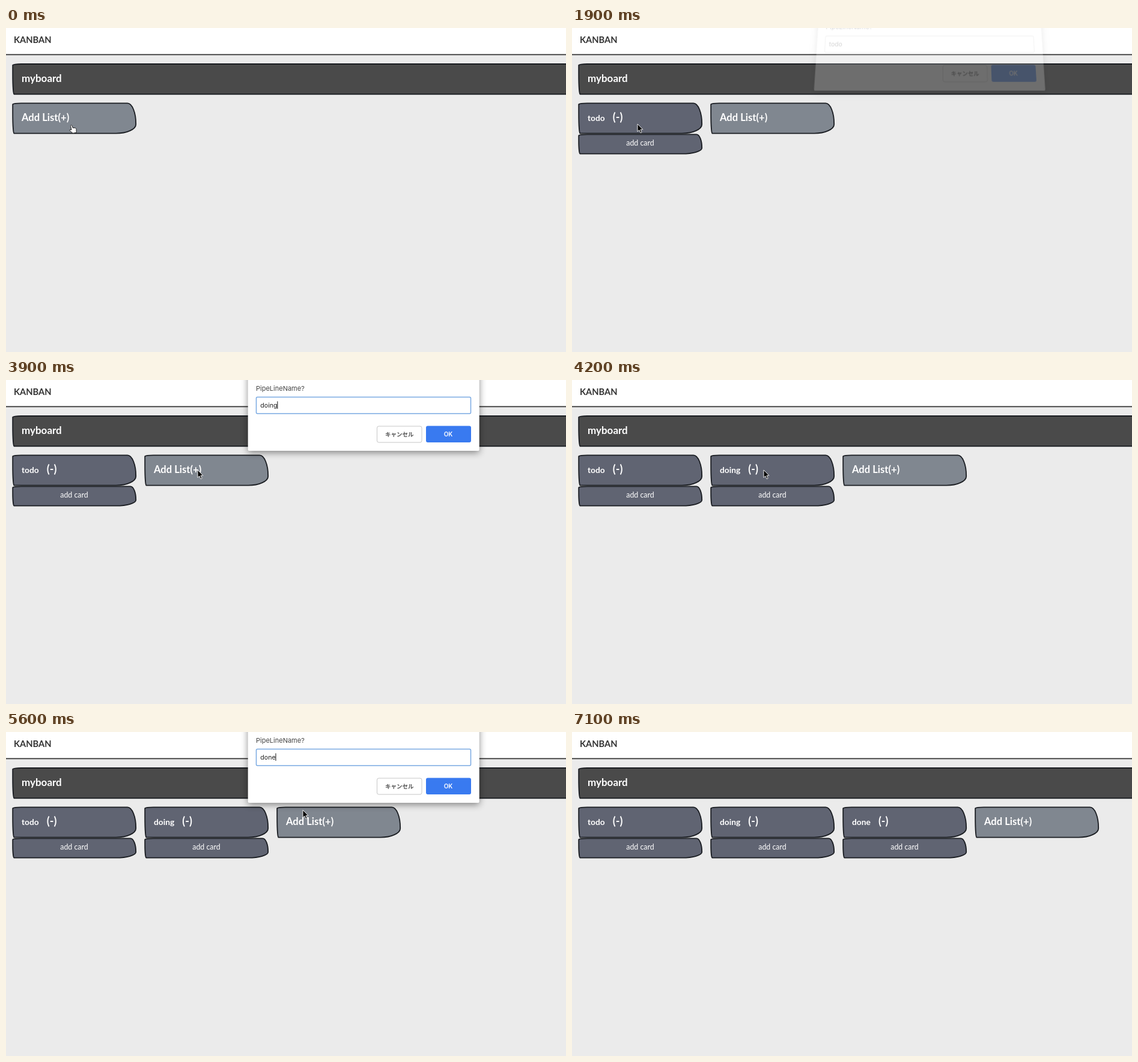
Animation, 932 px wide and 540 px high, one loop 7.2 s. Source, as an HTML page:

```html
<!DOCTYPE html>
<html lang="ja">
<head>
<meta charset="utf-8">
<title>Kanban board</title>
<style>
html, body { margin: 0; width: 100%; height: 100%; overflow: hidden; background: #ebebeb; }
svg { position: absolute; left: 0; top: 0; width: 932px; height: 540px; font-family: Lato, "Open Sans", sans-serif; }
#board text { fill: #fff; font-weight: 700; }
#board .logo { fill: #333; font-size: 14.7px; }
.big { font-size: 16.6px; }
.name { font-size: 13.8px; }
.minus { font-size: 18px; }
#board .card { font-size: 12.4px; font-weight: 400; text-anchor: middle; }
.box { stroke: #191c21; stroke-width: 1.8; }
#dialog { font-family: Inter, Roboto, sans-serif; transform-origin: 595px 118px; }
#dialog .panel { fill: #fff; filter: drop-shadow(0 3px 6px rgba(0, 0, 0, .45)); }
#dialog .button { font-size: 10px; font-weight: 600; text-anchor: middle; }
#typed { font-size: 10.6px; fill: #222; }
</style>
</head>
<body>
<svg id="board">
  <rect width="932" height="44" fill="#fff"/>
  <path d="M0 44.4H932" stroke="#333" stroke-width="1.7"/>
  <text class="logo" x="13" y="24.5">KANBAN</text>
  <g id="boxes"></g>
</svg>
<svg id="dialog">
  <rect class="panel" x="402.7" y="-60" width="385" height="178" rx="2"/>
  <text x="416" y="17.5" font-size="11" fill="#444">PipeLineName?</text>
  <rect id="field" x="416.5" y="28.5" width="357" height="27.5" rx="2" fill="#fff" stroke-width="1.5"/>
  <text id="typed" x="423.3" y="46"></text>
  <path id="caret" stroke="#111" stroke-width="1"/>
  <rect x="617.5" y="77" width="74.5" height="27" rx="3" fill="#fff" stroke="#c6c6c6"/>
  <text class="button" x="654.7" y="93.6" fill="#555" style="font-family:'Noto Sans CJK JP','Noto Sans CJK',sans-serif;font-size:9.5px">キャンセル</text>
  <rect x="699" y="76.5" width="75" height="27.5" rx="3" fill="#397af0"/>
  <text class="button" x="736" y="93.8" fill="#fff">OK</text>
</svg>
<svg id="pointer">
  <path id="arrow" d="M0 0V12.6L2.9 10 5 14.8 7.1 13.9 5.1 9.2H9Z" fill="#000" stroke="#fff" stroke-width=".9"/>
  <path id="hand" d="M2 2.4C1.6 .9 3.7 .3 4.3 1.8L5.6 5.4 9.4 5.6C11 5.8 11.4 6.8 11.5 8.2L11.6 13.4 5.6 14.3 .8 10.2C-.2 8.8 1.2 7.8 2.6 8.6L3.5 8.9Z" fill="#fff" stroke="#222"/>
</svg>
<script>
const LOOP = 7200, STEP = 100;
const $ = id => document.getElementById(id);

// One entry per prompt: opening, keystrokes, closing
const prompts = [
  { name: "todo", open: 200, keys: [1100, 1300, 1500, 1600], close: 1800, blink: [700, 1100] },
  { name: "doing", open: 3000, keys: [3300, 3400, 3500, 3600, 3800], close: 4000 },
  { name: "done", open: 4900, keys: [5200, 5300, 5500, 5600], close: 5900 }
];

const track = [ // time, x, y
  [0, 109, 160], [2400, 109, 160], [2900, 319, 150], [4300, 319, 150], [4700, 494, 130],
  [6100, 494, 130], [6500, 532, 244], [6600, 561, 450], [6700, 572, 560], [LOOP, 572, 560]
];

// Hand-drawn looking box with uneven elliptical corners
function box(x, y, w, h, fill) {
  const r = x + w, b = y + h, side = .69 * h, low = .3 * h, cut = .28 * h;
  return `<path class="box" fill="${fill}" d="M${x + 14} ${y}H${r - cut}A${cut} ${side} 0 0 1 ${r} ${y + side}
    V${b - low}A33 ${low} 0 0 1 ${r - 33} ${b}H${x + 2}A2 ${side} 0 0 1 ${x} ${b - side}
    V${y + 2}A14 2 0 0 1 ${x + 14} ${y}Z"/>`;
}

const column = (i, body) => `<g transform="translate(${220 * i})">${body}</g>`;

const list = (p, i) => column(i,
  box(11.2, 125.3, 205, 50.3, "#606472") +
  box(11.2, 177.3, 205, 32.3, "#606472") +
  `<text class="name" x="26" y="155">${p.name}<tspan class="minus" dx="13">(-)</tspan></text>
   <text class="card" x="113.5" y="196">add card</text>`);

const addList = i => column(i,
  box(11.2, 125.3, 205, 50.3, "#808790") + `<text class="big" x="26" y="155">Add List(+)</text>`);

function drawBoard(t) {
  const lists = prompts.filter(p => t >= p.close + 100);
  $("boxes").innerHTML = box(11.2, 60, 960, 50.3, "#4a4a4a") +
    `<text x="26" y="90" font-size="17">myboard</text>` +
    lists.map(list).join("") + addList(lists.length);
}

function drawDialog(t) {
  const p = prompts.find(p => t >= p.open && t < p.close + 200);
  $("dialog").style.display = p ? "" : "none";
  if (!p) return;
  const closing = t >= p.close;
  const shown = closing ? .65 - (t - p.close) * .0045 : Math.min(1, .4 + (t - p.open) * .005);
  const away = 1 - shown;
  $("dialog").style.opacity = shown;
  $("dialog").style.transform =
    `matrix3d(1,0,0,0, 0,${1 + .07 * away},0,${-.00045 * away}, 0,0,1,0, 0,${-17 * away},0,1)`;
  $("field").setAttribute("stroke", closing ? "#ccc" : "#79a9e2");
  $("typed").textContent = p.name.slice(0, p.keys.filter(k => t >= k).length);
  const blank = closing || p.blink && t >= p.blink[0] && t < p.blink[1];
  const x = 424 + ($("typed").textContent ? $("typed").getComputedTextLength() - .3 : 0);
  $("caret").setAttribute("d", blank ? "" : `M${x} 35.5V48`);
}

function drawPointer(t) {
  const i = track.findIndex(k => t < k[0]);
  const [t0, x0, y0] = track[i - 1], [t1, x1, y1] = track[i];
  const u = (t - t0) / (t1 - t0), e = u * u * (3 - 2 * u);
  const overLink = t < 200;
  $("arrow").style.display = overLink ? "none" : "";
  $("hand").style.display = overLink ? "" : "none";
  $("arrow").setAttribute("transform", `translate(${x0 + (x1 - x0) * e} ${y0 + (y1 - y0) * e})`);
  $("hand").setAttribute("transform", "translate(105.5 161)");
}

let last = -1;
function frame(now) {
  const t = Math.floor(now % LOOP / STEP) * STEP;
  if (t !== last) {
    last = t;
    drawBoard(t);
    drawDialog(t);
    drawPointer(t);
  }
  requestAnimationFrame(frame);
}
frame(0);
</script>
</body>
</html>
```
